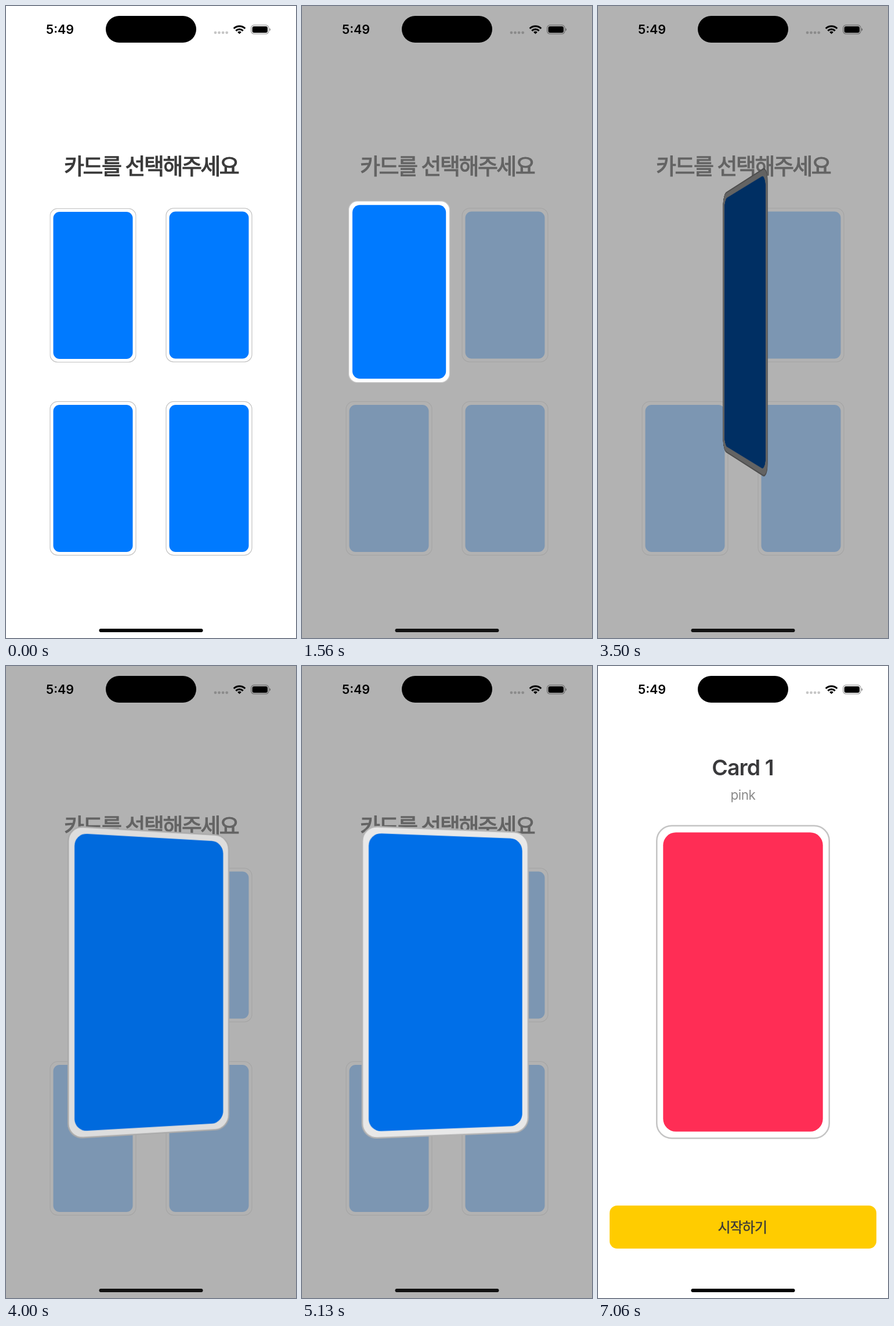
Animation of 500 by 1087 pixels, one loop 8000 ms. Source, as an HTML page:

```html
<!DOCTYPE html>
<html lang="ko">
<head>
<meta charset="utf-8">
<title>Card picker</title>
<style>
  html, body { margin: 0; width: 100%; height: 100%; overflow: hidden; background: #fff; }
  #stage { position: relative; width: 500px; height: 1087px; overflow: hidden; background: #fff; }
  #stage svg, .layer { position: absolute; left: 0; top: 0; display: block; }
  .layer { width: 500px; height: 1087px; }
  #dim { background: #000; opacity: 0; }
  #result { opacity: 0; }
  #card { position: absolute; left: 100px; top: 273.5px; width: 300px; height: 540px; }
  text { font-family: Inter, "Noto Sans CJK KR", "Noto Sans CJK", sans-serif; }
  .ko { font-family: "Noto Sans CJK KR", "Noto Sans CJK", "Noto Sans", sans-serif; font-weight: 400; }
</style>
</head>
<body>
<div id="stage">
  <div class="layer" id="picker">
    <svg width="500" height="1087">
      <defs>
        <g id="face">
          <rect x="1.25" y="1.25" width="297.5" height="537.5" rx="26" fill="#fff" stroke="#c4c4c4" stroke-width="2.5"/>
          <rect class="fill" x="12.3" y="12.7" width="275.4" height="514.6" rx="22"/>
        </g>
      </defs>
      <text id="title" class="ko" x="100" y="289" font-size="38" letter-spacing="-2.5"
        fill="#3a3a3a" stroke="#3a3a3a" stroke-width="1.2">카드를 선택해주세요</text>
      <g id="others" fill="#007aff"></g>
    </svg>
    <div class="layer" id="dim"></div>
    <div id="card"><svg width="300" height="540" fill="#007aff"><use href="#face"/></svg></div>
  </div>

  <div class="layer" id="result">
    <svg width="500" height="1087">
      <text x="249.5" y="188" font-size="37.5" font-weight="600" letter-spacing="-0.9" text-anchor="middle" fill="#3a3a3c">Card 1</text>
      <text x="250" y="230" font-size="22.5" letter-spacing="-0.5" text-anchor="middle" fill="#8a8a8a">pink</text>
      <use href="#face" x="100" y="273.5" fill="#ff2d55"/>
      <rect x="20" y="928" width="460" height="74" rx="13" fill="#ffcc00"/>
      <text class="ko" x="206.5" y="974" font-size="24" letter-spacing="-0.9" fill="#3a3a3a" stroke="#3a3a3a" stroke-width=".4">시작하기</text>
    </svg>
  </div>

  <svg width="500" height="1087">
    <defs>
      <linearGradient id="grey">
        <stop offset="0" stop-color="#5a5a5a"/>
        <stop offset=".85" stop-color="#5c5c5c"/>
        <stop offset="1" stop-color="#a4a4a4"/>
      </linearGradient>
    </defs>
    <text x="69" y="48" font-size="21.5" font-weight="600">5:49</text>
    <rect x="172" y="17" width="156" height="46" rx="23"/>
    <g opacity=".22">
      <circle cx="361" cy="45.8" r="2.4"/><circle cx="367.5" cy="45.8" r="2.4"/>
      <circle cx="374.1" cy="45.8" r="2.4"/><circle cx="380.7" cy="45.8" r="2.4"/>
    </g>
    <g fill="none" stroke="#000" stroke-width="3">
      <path d="M392.7 38.8a14 14 0 0 1 19.6 0"/>
      <path d="M396.3 42.6a8.8 8.8 0 0 1 12.4 0"/>
    </g>
    <path d="M402.5 48.2l-3.3-3.3a4.7 4.7 0 0 1 6.6 0z"/>
    <rect x="422.6" y="32.9" width="30.4" height="15" rx="4.8" fill="none" stroke="#000" stroke-opacity=".4" stroke-width="1.2"/>
    <rect x="424.6" y="34.9" width="26.4" height="11" rx="3"/>
    <path d="M454.4 38v5q1.7-.7 1.7-2.5t-1.7-2.5z" opacity=".45"/>
    <rect id="bar" x="160.5" y="1071" width="179" height="6" rx="3"/>
    <rect id="greyBar" x="160.5" y="1071" width="179" height="6" rx="3" fill="url(#grey)" opacity="0"/>
  </svg>
</div>

<script>
const LOOP = 8000;
const DIM = [1170, 1480];
const MOVE = 1490;
const FLIP = { start: 2591, length: 372, count: 7 };
const LEAVE = [5200, 5690];
const ARRIVE = [6505, 7055];

const $ = id => document.getElementById(id);
const mix = (a, b, p) => a + (b - a) * p;
const clamp = x => Math.min(1, Math.max(0, x));

// cubic-bezier(.42, 0, .58, 1)
function ease(x) {
  if (x <= 0 || x >= 1) return clamp(x);
  let lo = 0, hi = 1;
  for (let i = 0; i < 24; i++) {
    const s = (lo + hi) / 2;
    const at = 3 * (1 - s) * s * mix(0.42, 0.58, s) + s ** 3;
    if (at < x) lo = s; else hi = s;
  }
  return lo * lo * (3 - 2 * lo);
}
const ramp = (t, [from, to]) => ease((t - from) / (to - from));

// Damped spring from 0 to 1, time in seconds
function spring(s) {
  if (s <= 0) return 0;
  if (s >= 1) return 1;
  const damping = 0.7, speed = 9.9, root = Math.sqrt(1 - damping ** 2);
  const a = speed * root * s;
  return 1 - Math.exp(-damping * speed * s) * (Math.cos(a) + damping / root * Math.sin(a));
}

// Signed tilt in degrees; positive brings the right edge forward
function tilt(t) {
  const turns = (t - FLIP.start) / FLIP.length;
  if (turns <= 0 || turns >= FLIP.count) return 0;
  const angle = 180 * ease(turns % 1);
  return angle < 90 ? angle : angle - 180;
}

function poseCard(t) {
  const p = spring((t - MOVE) / 1000);
  const angle = tilt(t);
  const style = $('card').style;
  if (angle) {
    const back = 150 * Math.sin(Math.abs(angle) * Math.PI / 180);
    style.transform = `perspective(1272px) translateZ(${-back}px) rotateY(${-angle}deg)`;
    style.filter = `brightness(${1 - 0.75 * Math.abs(angle) / 90})`;
  } else {
    style.transform = `translate(${mix(-100, 0, p)}px, ${mix(-63.5, 0, p)}px) ` +
      `scale(${mix(0.4975, 1, p)}, ${mix(0.4913, 1, p)})`;
    style.filter = 'none';
  }
}

function draw(t) {
  const dim = ramp(t, DIM), leave = ramp(t, LEAVE), arrive = ramp(t, ARRIVE);
  $('dim').style.opacity = 0.3 * dim;
  $('title').setAttribute('opacity', mix(1, 0.57, dim));
  for (const card of $('others').children) card.setAttribute('opacity', mix(1, 0.3, dim));
  poseCard(t);
  $('picker').style.opacity = 1 - leave;
  $('result').style.opacity = arrive;
  const shade = Math.round(17 * dim * (1 - leave));
  $('bar').setAttribute('fill', `rgb(${shade},${shade},${shade})`);
  $('greyBar').setAttribute('opacity', leave * (1 - arrive));
}

$('others').innerHTML = [[350, 480], [150, 812.5], [350, 812.5]].map(([x, y]) =>
  `<g><use href="#face" transform="translate(${x} ${y}) scale(.4975 .4913) translate(-150 -270)"/></g>`).join('');

const begun = performance.now();
function tick() {
  draw((performance.now() - begun) % LOOP);
  requestAnimationFrame(tick);
}
draw(0);
requestAnimationFrame(tick);
</script>
</body>
</html>
```
